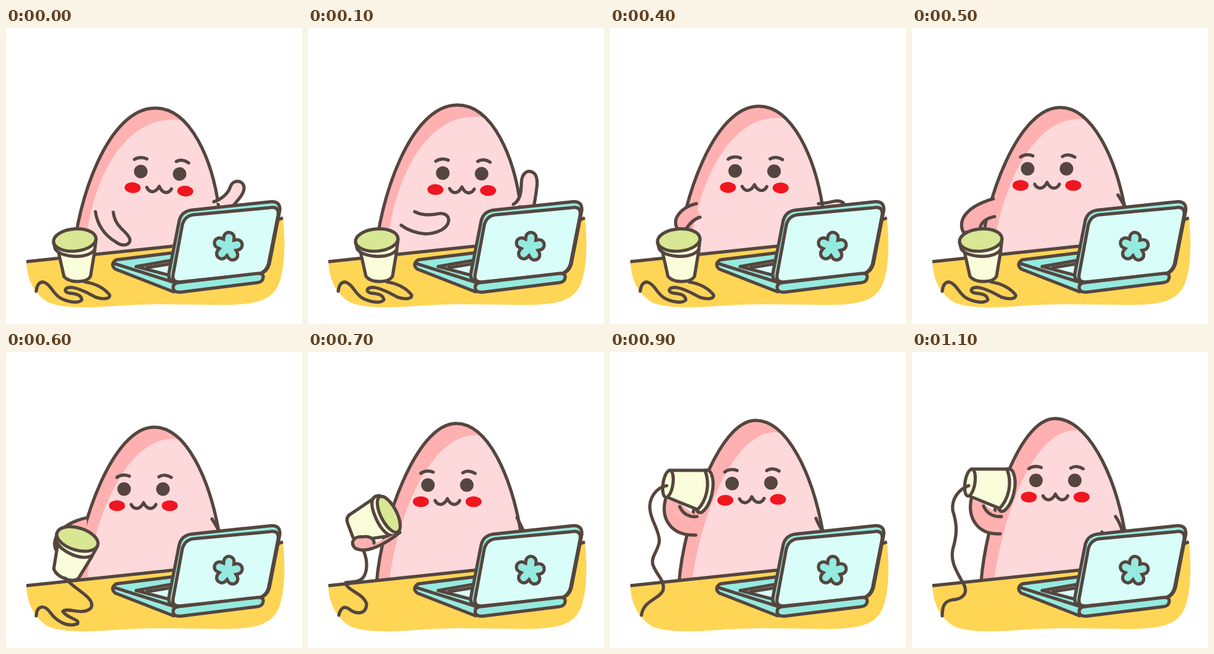
Recreate the animation shown at these times as an HTML page. Size 480 by 480 pixels, loop 2000 ms.

```html
<!DOCTYPE html>
<html lang="en">
<head>
<meta charset="utf-8">
<title>Cup phone</title>
<style>
  html, body { margin: 0; width: 100%; height: 100%; overflow: hidden; background: #fff; }
  svg { display: block; width: 100vw; height: 100vh; }
  .ink { stroke: #54463f; stroke-width: 5.2; stroke-linecap: round; stroke-linejoin: round; }
  .flat { stroke-linecap: butt; }
  .none { fill: none; }
  .dark { fill: #54463f; }
  .pink { fill: #fdd9db; }
  .rose { fill: #ffb1b1; }
  .red { fill: #f0161f; }
  .desk { fill: #ffd556; }
  .teal { fill: #95eadf; }
  .ice { fill: #d9fdf8; }
  .cream { fill: #f9fdda; }
  .lime { fill: #d8e793; }
</style>
</head>
<body>
<svg viewBox="0 -0.8 480 480">
  <defs>
    <path id="body"/>
    <clipPath id="inside"><use href="#body"/></clipPath>
    <path id="petals"/>
  </defs>

  <use href="#body" class="rose"/>
  <path id="light" class="pink" clip-path="url(#inside)"/>
  <use href="#body" class="ink none"/>

  <g id="face">
    <g class="dark">
      <circle cx="-31.5" r="11"/>
      <circle cx="31.5" r="11"/>
    </g>
    <g class="red">
      <ellipse cx="-43" cy="27" rx="13" ry="8.8"/>
      <ellipse cx="42.5" cy="27" rx="13" ry="8.8"/>
    </g>
    <g class="ink none">
      <path d="M-43 -19C-38 -23 -29 -24 -23 -21"/>
      <path d="M25 -20C31 -24 39 -23 45 -19"/>
      <path d="M-20 25C-17 31 -12 32 -9 31C-5 30 -2 26 0 22C2 26 5 30 9 31C12 32 17 31 20 25"/>
    </g>
  </g>

  <path id="pad" class="rose"/>
  <path id="arm" class="ink"/>
  <path id="right" class="ink pink"/>

  <path class="desk" d="M33 378L270 353Q370 340 449 306C453 345 453 385 443 413C432 440 408 446 370 448C310 449 250 445 190 449C140 453 92 455 68 444C43 428 34 404 33 378Z"/>
  <path class="ink flat none" d="M33 378L270 353Q370 340 449 307"/>

  <g id="cup">
    <g id="down" class="ink">
      <path class="cream" d="M85 362L94 402C103 413 130 413 137 402L144 360Z"/>
      <path class="cream" d="M77 347L80 358C92 373 135 374 144 358L146 342Z"/>
      <ellipse class="lime" cx="111.5" cy="343" rx="34.5" ry="18" transform="rotate(-5 111.5 343)"/>
    </g>
    <g id="tilt" class="ink">
      <path class="cream" d="M106 237L69 262Q61 267 64 276L73 300Q78 306 88 304L134 297Z"/>
      <path class="cream" d="M116 232C101 232 102 247 107 261C114 280 126 299 140 297L148 291Z"/>
      <ellipse class="lime" cx="131" cy="262.5" rx="13" ry="32" transform="rotate(-27 131 262.5)"/>
    </g>
    <g id="ear" class="ink">
      <path class="cream" d="M96 191L154 191C164 212 157 240 143 255L91 234Z"/>
      <path class="cream" d="M154 191C163 214 157 240 141 256Q143 261 149 259C164 248 172 214 164 196Q160 189 154 191Z"/>
      <ellipse class="cream" cx="94" cy="213" rx="8" ry="22" transform="rotate(9 94 213)"/>
    </g>
  </g>
  <path id="cord" class="ink none"/>
  <path id="hand" class="ink rose"/>

  <g class="ink">
    <path class="teal" d="M179 375L276 363L272 427L177 390Q168 382 179 375Z"/>
    <path class="none" d="M175 381L270 411"/>
    <path class="ice" d="M211 386L268 376L264 400Z"/>
    <path class="none" d="M228 388L265 382"/>
    <path class="teal" d="M270 410Q263 407 264 398L281 311Q285 297 300 294.5L428 281Q445 279 444 295L427 382Q423 395 412 398Z"/>
    <path class="ice" d="M304 302L428 290.5Q444 288 441 304L426 380Q422 396 408 398L282 411Q269 412 271 399L286 318Q290 304 304 302Z"/>
    <path class="teal" d="M280 412L409 397Q418 397 417 404Q416 411 408 412L283 427.5Q271 428 271 420Q271 413 280 412Z"/>
  </g>
  <g class="none" stroke-linecap="round" stroke-linejoin="round" transform="translate(360 354)">
    <use href="#petals" stroke="#54463f" stroke-width="22"/>
    <use href="#petals" stroke="#95eadf" stroke-width="11.6"/>
  </g>
</svg>
<script>
const el = id => document.getElementById(id);
const put = (id, name, value) => el(id).setAttribute(name, value);

put('petals', 'd', [0, 1, 2, 3, 4].map(i => {
  const a = (i * 72 - 84) * Math.PI / 180;
  return `M0 0L${15 * Math.cos(a)} ${15 * Math.sin(a)}`;
}).join(''));

// Averages every number found in two poses of the same structure.
function mix(a, b) {
  const out = {};
  for (const key of Object.keys(a)) {
    const other = b[key].match(/-?[\d.]+/g) || [];
    let i = 0;
    out[key] = a[key].replace(/-?[\d.]+/g, n => (+n + +other[i++]) / 2);
  }
  return out;
}

const rest = {
  cup: 'down', move: 'translate(0 0)', pad: '', hand: '', tint: 'pink',
  cord: 'M128 411C146 414 160 422 168 432C169 440 155 439 146 436C134 430 124 423 108 420' +
    'C94 419 93 427 102 429C114 430 122 432 123 440C118 447 98 443 88 437C76 430 72 414 60 411C53 411 50 418 49 426'
};
const stub = 'M334 270C338 276 342 283 346 290';

// body: apex x, apex y, lean; face: x, y, angle
const start = { ...rest, body: '242 129 0', face: '250 234 3.7',
  arm: 'M145 297C148 318 160 336 178 346C190 355 202 351 201 342C198 329 177 324 174 298',
  right: 'M337 281C352 276 361 266 364 256C368 245 384 245 386 257C387 268 376 278 366 290' };
const raised = { ...rest, body: '242 124 0', face: '250 235 1',
  arm: 'M173 297C185 303 197 303 208 301C224 297 231 306 227 316C222 327 205 333 191 333C176 332 162 327 151 319',
  right: 'M333 285C343 280 346 268 346 250C347 232 358 228 367 235C375 243 371 260 366 290' };
const typing = { ...raised,
  arm: 'M172 297C180 310 192 318 205 321C218 326 219 340 209 346C200 348 184 342 172 334C160 326 150 317 144 308',
  right: 'M340 287C352 286 362 279 372 273C382 268 392 272 391 282C390 286 388 290 386 292' };
const reach = { ...rest, body: '240 128 .6', face: '219 227.5 0', tint: 'rose', right: stub,
  arm: 'M132 276C115 281 95 289 85 304C79 313 79 324 84 331L110 328C110 314 122 307 134 305' };
const leaning = { ...mix(typing, reach), tint: 'rose',
  arm: 'M140 284C124 288 112 297 107 309C104 322 112 331 122 328C128 317 136 309 146 306',
  right: 'M338 284C348 284 356 282 364 280C374 278 380 282 382 290' };
const tilted = { ...rest, body: '240 115 .8', face: '226 215 0', cup: 'tilt', tint: 'rose', arm: '',
  right: 'M339 268C342 274 346 282 350 290',
  hand: 'M107 309C108 301 98 297 88 299C74 298 68 308 76 317C94 328 126 310 149 292',
  cord: 'M82 308C96 326 97 346 93 358C88 374 74 371 61 373C62 386 90 390 95 408C94 426 78 424 68 417C58 409 53 415 50 426' };
const lift = { ...reach, body: '240 121 .7', face: '223 221.5 0', move: 'translate(-4 -42) rotate(22 112 365)',
  arm: 'M131 268C112 272 90 282 82 298C77 308 78 318 84 324L110 316C110 308 122 301 132 299',
  cord: 'M96 366C112 385 146 398 138 414C124 428 100 412 92 420C100 432 120 432 116 440' +
    'C100 446 82 436 72 422C62 408 50 410 49 427' };
const listen = { ...rest, body: '236 110 1', face: '229.5 212 -1', cup: 'ear', tint: 'rose',
  move: 'translate(0 0) rotate(0 120 225)', right: 'M334 269C337 276 341 284 345 290',
  pad: 'M90 238L139 296L143 267L113 245Z',
  arm: 'M90 238C82 268 98 298 139 296M141 266C130 268 118 262 113 250',
  cord: 'M92 216C75 219 62 236 65 256C67 274 80 288 80 306C78 322 67 330 69 342C72 358 90 368 86 386C80 400 54 402 51 426' };
const end = { ...listen, body: '232 107 1', face: '232.5 207.5 0',
  move: 'translate(0 -2) rotate(0 120 225)', right: 'M330 266C335 273 339 282 341 290M308 291L309 293',
  pad: 'M95 238L143 294L145 266L116 245Z',
  arm: 'M96 238C90 268 106 296 143 294M145 266C132 267 121 261 116 249',
  cord: 'M92 216C75 222 64 238 66 256C72 275 74 290 68 312C60 335 70 352 84 376C92 392 80 400 66 401C52 403 49 412 49 427' };
const turn = { ...listen, body: '238 112.5 .9', face: '228 213.5 0',
  move: 'translate(-10 18) rotate(-15 120 225)', pad: 'M82 272L132 303L132 280L105 262Z',
  arm: 'M82 270C80 292 100 312 133 304M134 283C122 286 110 280 104 270',
  cord: 'M84 242C80 258 70 280 80 300C88 324 78 342 68 360C62 376 90 386 88 402C84 418 72 412 64 412C54 412 50 418 49 427' };

const poses = [start, raised, mix(raised, typing), typing, leaning, reach, lift, tilted, turn, listen,
  { ...mix(listen, end), right: listen.right }, end];

function draw(p) {
  const [x, y, s] = p.body.split(' ').map(Number);
  put('body', 'd', `M${109 + 3 * s} 372C${115 + 4 * s} 280 ${x - 77 + 15 * s} ${y} ${x} ${y}` +
    `C${x + 58 - 7 * s} ${y} ${335 - 7 * s} ${y + 86} 345 290L347 372Z`);
  put('light', 'd', `M${x + 42} ${y + 20}C${x - 57 + 24 * s} ${y + 6} ${131 + 16 * s} 265 ${128 + 5 * s} 372` +
    `L360 372V${y + 20}Z`);
  const [fx, fy, angle] = p.face.split(' ');
  put('face', 'transform', `translate(${fx} ${fy}) rotate(${angle})`);
  for (const id of ['pad', 'arm', 'right', 'cord', 'hand']) put(id, 'd', p[id]);
  put('arm', 'class', 'ink ' + p.tint);
  put('cup', 'transform', p.move);
  for (const id of ['down', 'tilt', 'ear']) el(id).style.display = id === p.cup ? '' : 'none';
}

const begun = performance.now();
let shown = -1;
function tick() {
  const step = Math.min(11, Math.floor((performance.now() - begun) % 2000 / 100));
  if (step !== shown) draw(poses[shown = step]);
  requestAnimationFrame(tick);
}
tick();
</script>
</body>
</html>
```
